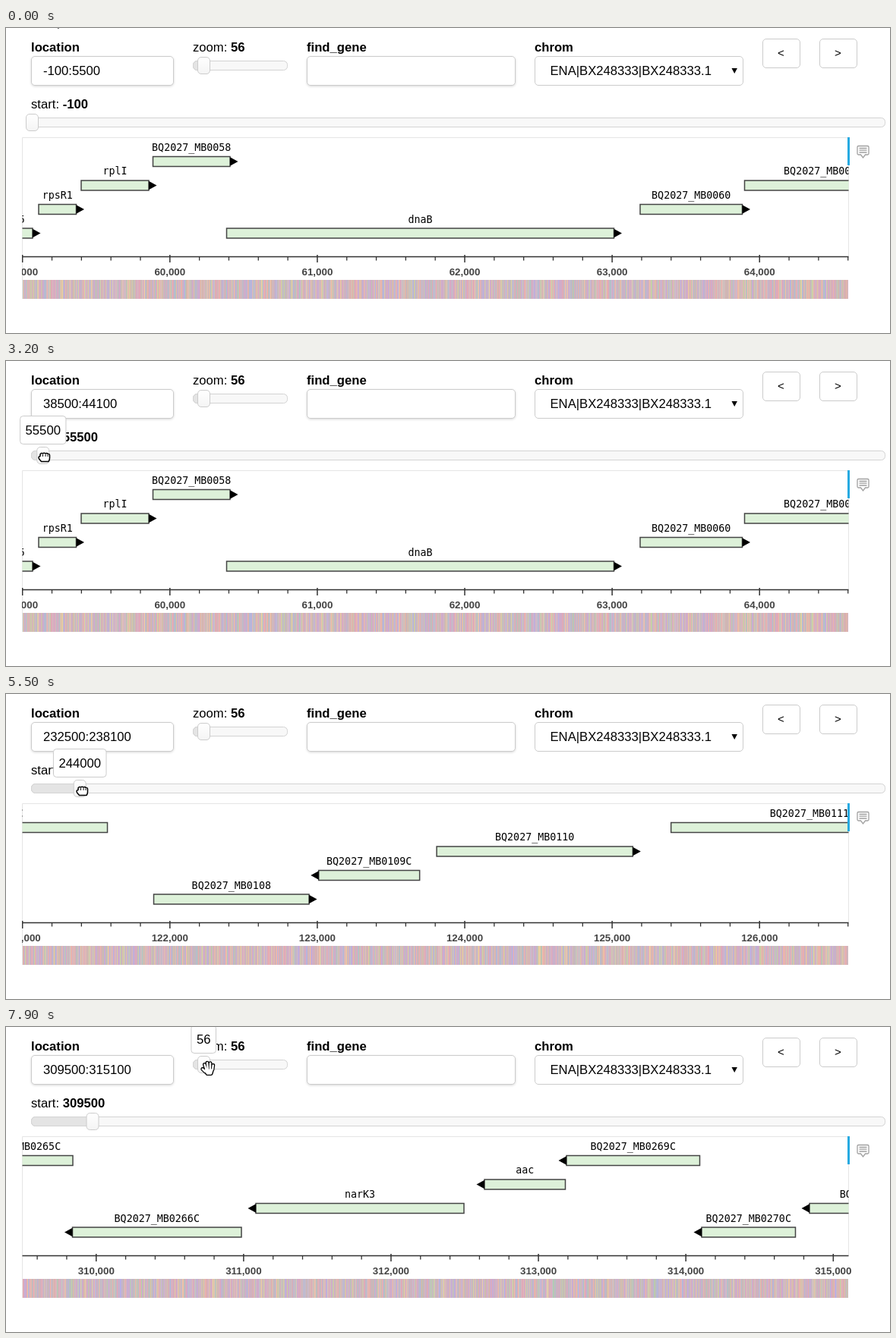
An HTML page with a canvas that plays this animation: 1164x402 px, repeating every 8000 ms.

```html
<!DOCTYPE html>
<html lang="en">
<head>
<meta charset="utf-8">
<title>Genome browser</title>
<style>
  html, body { margin: 0; width: 100%; height: 100%; overflow: hidden; background: #fff; }
  svg, canvas { position: absolute; display: block; }
  svg { left: 0; top: 0; }
  #bases { left: 21px; top: 332px; }
  text { font: 16.67px "Liberation Sans", Arial, sans-serif; fill: #000; white-space: pre; }
  .bold { font-weight: bold; }
  .small { font-size: 15px; text-anchor: middle; }
  .gene text { font: 13.33px "DejaVu Sans Mono", monospace; text-anchor: middle; }
  .gene rect { fill: #ddf1d9; stroke: #444; stroke-width: 1.5; }
  .axis text { font-size: 13.33px; font-weight: bold; fill: #444; text-anchor: middle; }
  .axis path { stroke: #333; fill: none; }
  .box, .tip rect { fill: #fff; stroke: #ccc; }
  .tip text { text-anchor: middle; }
  .shadow { filter: drop-shadow(0 1.5px 1.5px rgba(0,0,0,.16)); }
  .track { fill: #f8f8f8; stroke: #d3d3d3; }
  .fill { fill: #e4e4e4; stroke: #d3d3d3; }
  .handle { fill: url(#knob); stroke: #ccc; }
  .cursor path { stroke-linecap: round; stroke-linejoin: round; }
</style>
</head>
<body>
<canvas id="bases" width="1088" height="25"></canvas>
<svg width="1164" height="402" viewBox="0 0 1164 402">
  <defs>
    <linearGradient id="knob" x2="0" y2="1">
      <stop offset="0" stop-color="#fff"/><stop offset="1" stop-color="#f4f4f4"/>
    </linearGradient>
    <clipPath id="plotClip"><rect x="21.5" y="144" width="1088" height="157"/></clipPath>
    <clipPath id="axisClip"><rect x="21" y="290" width="1110" height="45"/></clipPath>
  </defs>

  <text class="bold" x="33" y="31">location</text>
  <text x="246" y="31">zoom: <tspan class="bold">56</tspan></text>
  <text class="bold" x="396" y="31">find_gene</text>
  <text class="bold" x="696" y="31">chrom</text>
  <rect class="box shadow" x="33.5" y="37.5" width="187" height="38" rx="4.5"/>
  <rect class="box shadow" x="396.5" y="37.5" width="274" height="38" rx="4.5"/>
  <rect class="box" x="696.5" y="37.5" width="274" height="38" rx="4.5"/>
  <text id="location" x="49" y="62"></text>
  <text x="716.5" y="62">ENA|BX248333|BX248333.1</text>
  <path d="M955.5 53h7.4l-3.7 7z"/>
  <rect class="box" x="996.5" y="14.5" width="49" height="38" rx="4.5"/>
  <rect class="box" x="1071.5" y="14.5" width="49" height="38" rx="4.5"/>
  <text class="small" x="1020.5" y="38">&lt;</text>
  <text class="small" x="1095.5" y="38">&gt;</text>

  <rect class="track" x="246.5" y="43.5" width="124" height="12" rx="5"/>
  <rect class="fill" x="246.5" y="43.5" width="14" height="12" rx="5"/>
  <rect class="handle" x="252.5" y="38.5" width="16" height="22" rx="4.5"/>

  <text x="33" y="106">start: <tspan class="bold" id="start"></tspan></text>
  <rect class="track" x="33.5" y="118.5" width="1124" height="12" rx="5"/>
  <rect class="fill" id="startFill" x="33.5" y="118.5" height="12" rx="5"/>
  <rect class="handle" id="startHandle" y="113.5" width="16" height="22" rx="4.5"/>

  <path d="M21.5 357V144.5H1109.5V301" fill="none" stroke="#e5e5e5"/>
  <g id="genes" clip-path="url(#plotClip)"></g>
  <g class="axis" id="axis" clip-path="url(#axisClip)"></g>
  <rect x="1108" y="144" width="3" height="37" fill="#26aae1"/>
  <g fill="none" stroke="#a0a0a0" stroke-width="1.3">
    <path d="M1122.5 155.5h12q1.5 0 1.5 1.5v8.5q0 1.5-1.5 1.5h-3l-3 4-3-4h-3q-1.5 0-1.5-1.5v-8.5q0-1.5 1.5-1.5z"/>
    <path d="M1123.5 158.5h10m-10 2.7h10m-10 2.8h10"/>
  </g>

  <g class="tip" id="startTip"><rect y="72.5" height="37" rx="4"/><text y="97"></text></g>
  <g class="tip" id="zoomTip"><rect y="-2.5" height="37" rx="4"/><text y="22"></text></g>
  <g class="cursor" id="cursor"></g>
</svg>
<script>
const LOOP = 8000, STEP = 100, SPAN = 5600, LEFT = 21.7, SCALE = 1087 / SPAN;
const GRAB = 2900, RELEASE = 6900;
const $ = id => document.getElementById(id);

// Key points, joined by straight moves: time, slider value
const drag = [[GRAB, -100], [3500, 111500], [4500, 111500], [5000, 155000],
              [5600, 261500], [6000, 261500], [6500, 309500]];
// time, x, y
const path = [[700, 62, -17], [1200, 178, 78], [1600, 60, 112], [2000, 42, 129], [2400, 38, 128],
              [GRAB, 38, 128], [3500, 61, 124], [4500, 61, 124], [5000, 92, 127], [5500, 100, 127],
              [6000, 100, 127], [6400, 118, 127], [6800, 118, 127], [RELEASE, 118, 131],
              [7500, 264, 57], [7900, 266, 54]];

// The location box follows the slider late, the plot later still.
const views = [
  { start: 59000, locAt: 0, plotAt: 0, row: 3, tag: 55,
    genes: [[-90, 35, ">"], [43, 92.5, ">", "rpsR1"], [99, 188, ">", "rplI"], [193.5, 295, ">"],
            [290.5, 800.5, ">", "dnaB"], [835, 969.5, ">"], [972.5, 1180, ">"]] },
  { start: 38500, locAt: 3200, plotAt: 3300, row: 2, tag: 36,
    genes: [[-300, 105.5, ">"], [126.5, 277, "<"], [285.5, 543.5, "<"], [562.5, 681.5, ">"],
            [699, 766.5, "<"], [782, 963.5, "<", "mtc28"], [1001, 1500, ">"]] },
  { start: 111500, locAt: 3700, plotAt: 4200, row: 0, tag: 104, genes: [[-262, 1200, ">", "nrp"]] },
  { start: 121000, locAt: 4800, plotAt: 5200, row: 0, tag: 107 },
  { start: 232500, locAt: 5500, plotAt: 5600, row: 2, tag: 203,
    genes: [[7, 443, ">"], [451, 838, "<", "zmp1"], [846, 974.5, ">"], [973.5, 1107.5, ">"], [1107, 1205, "<"]] },
  { start: 261500, locAt: 6200, plotAt: 6200, row: 1, tag: 225 },
  { start: 309500, locAt: 6700, plotAt: 6900, row: 0, tag: 265,
    genes: [[-56, 88, "<"], [87.5, 310, "<"], [329, 603, "<", "narK3"], [630, 736.5, "<", "aac"],
            [738, 913.5, "<"], [916, 1039.5, "<"], [1058, 1250, "<"]] }
];

const shapes = {
  arrow: '<path d="M0 0V16l3.7-3.5 2.6 6 2.8-1.2-2.6-5.8h5z" stroke="#fff"/>',
  open: hand("M-4.5-4.5L-2.5 2M-1-6.8L-.3 1M3-6.3L2.8 1M6.7-3.5L6 2M-7.2 1.5L-3.5 5",
             "M-3.5 3L5.5 2.5 4 7.5H-1z"),
  shut: '<path d="M-6.5 3q-1.5-3 1.5-3.5V-3q1.5-2.5 3.5-1 1.5-1.5 3.5 0 2-1 3 .5 2.500-.5 2.500 2V2q0 2.500-1.500 4.500H-3.500z"' +
    ' fill="#fff" stroke="#000" stroke-width="1.5"/><path d="M-1.500-2.500v2M2-2.500v2M5-2v1.500" stroke="#000"/>'
};

function hand(fingers, palm) {
  return `<path d="${fingers}${palm}" stroke="#000" stroke-width="5"/>` +
    `<path d="${fingers}" stroke="#fff" stroke-width="2.5"/>` +
    `<path d="${palm}" fill="#fff" stroke="#fff" stroke-width="2.3"/>`;
}

function random(seed) {
  return () => {
    seed = (seed + 0x6D2B79F5) | 0;
    let n = Math.imul(seed ^ (seed >>> 15), 1 | seed);
    n = (n + Math.imul(n ^ (n >>> 7), 61 | n)) ^ n;
    return ((n ^ (n >>> 14)) >>> 0) / 4294967296;
  };
}

// Each pixel column blends a few bases; G and C are the common ones.
function drawBases(start) {
  const ctx = $("bases").getContext("2d"), next = random(start);
  const [g, c, a, t] = [[232, 168, 176], [184, 176, 228], [176, 208, 170], [238, 208, 160]];
  const bag = [g, g, c, c, a, t];
  for (let x = 0; x < 1088; x++) {
    const mix = [0, 0, 0];
    for (let k = 0; k < 3; k++) bag[Math.floor(next() * 6)].forEach((v, i) => mix[i] += v / 3);
    ctx.fillStyle = `rgb(${mix.map(Math.round)})`;
    ctx.fillRect(x, 0, 1, 25);
  }
}

function randomGenes(seed) {
  const next = random(seed), genes = [];
  for (let x = -200; x < 1110;) {
    const end = x + 120 + next() * 300;
    genes.push([x, end, next() < .5 ? "<" : ">"]);
    x = end + 5 + next() * 60;
  }
  return genes;
}

// Genes climb one row at a time and wrap around; tags count up.
function gene([x1, x2, strand, name], i, view) {
  const row = (view.row + 3 * i) % 4, y = 176 + row * 31.5, left = strand === "<";
  const label = name || `BQ2027_MB${String(view.tag + i).padStart(4, "0")}${left ? "C" : ""}`;
  const head = left ? `M${x1} ${y - 5.7}l-10.500 5.700 10.500 5.700z` : `M${x2} ${y - 5.7}l10.500 5.700-10.500 5.700z`;
  return `<g class="gene"><rect x="${x1}" y="${y - 6.5}" width="${x2 - x1}" height="13"/><path d="${head}"/>` +
    `<text x="${(x1 + x2) / 2}" y="${Math.floor(162.3 + 31.6 * row)}">${label}</text></g>`;
}

function drawPlot(view) {
  const { start } = view, genes = view.genes || randomGenes(start);
  $("genes").innerHTML = genes.map((g, i) => gene(g, i, view)).join("");
  let major = "", minor = "", labels = "";
  for (let bp = Math.ceil(start / 200) * 200; bp <= start + SPAN; bp += 200) {
    const x = LEFT + (bp - start) * SCALE;
    if (bp % 1000) minor += `M${x} 301.5v5`;
    else {
      major += `M${x} 299v10`;
      labels += `<text x="${x}" y="326">${bp.toLocaleString("en-US")}</text>`;
    }
  }
  $("axis").innerHTML = `<path d="M21.5 301.5H1109.5" stroke-width="1.7"/>` +
    `<path d="${major}" stroke-width="1.5"/><path d="${minor}" stroke-width="1.3"/>${labels}`;
  drawBases(start);
}

function drawTip(id, x, value, on) {
  const box = $(id).querySelector("rect"), text = $(id).querySelector("text");
  text.textContent = value;
  text.setAttribute("x", x);
  const w = text.getComputedTextLength() + 14;
  box.setAttribute("x", x - w / 2);
  box.setAttribute("width", w);
  $(id).setAttribute("visibility", on ? "visible" : "hidden");
}

function drawControls(value, loc) {
  const x = 34.5 + Math.max(value, 0) * 0.000257;
  $("location").textContent = `${loc}:${loc + SPAN}`;
  $("start").textContent = value;
  $("startFill").setAttribute("width", x - 33.5);
  $("startHandle").setAttribute("x", x - 8);
  return x;
}

// Value of a key point list at time t, as an array without the time.
function along(keys, t) {
  const next = keys.findIndex(k => k[0] > t);
  if (next < 0) return keys.at(-1).slice(1);
  const b = keys[next], a = keys[Math.max(next - 1, 0)];
  const p = a === b ? 0 : (t - a[0]) / (b[0] - a[0]);
  return a.slice(1).map((v, i) => v + (b[i + 1] - v) * p);
}

let drawn, plotted;

function draw(t) {
  const raw = along(drag, t)[0], [cx, cy] = along(path, t);
  const value = raw < 0 ? -100 : Math.round(raw / 500) * 500;
  const located = views.findLast(v => v.locAt <= t);
  const view = views.findLast(v => v.plotAt <= t);
  const x = drawControls(value, located === views[0] ? -100 : located.start);
  if (view !== plotted) drawPlot(plotted = view);

  const onStart = t >= 1900 && t < 7100, onZoom = t >= 7500;
  drawTip("startTip", x, Math.max(value, 0), onStart);
  drawTip("zoomTip", 260.2, 56, onZoom);
  const held = t >= GRAB && t < RELEASE;
  $("cursor").innerHTML = shapes[held ? "shut" : onStart || onZoom ? "open" : "arrow"];
  $("cursor").setAttribute("transform", `translate(${Math.round(cx)} ${Math.round(cy)})`);
}

function frame() {
  const t = Math.floor(performance.now() % LOOP / STEP) * STEP;
  if (t !== drawn) draw(drawn = t);
  requestAnimationFrame(frame);
}
frame();
</script>
</body>
</html>
```
